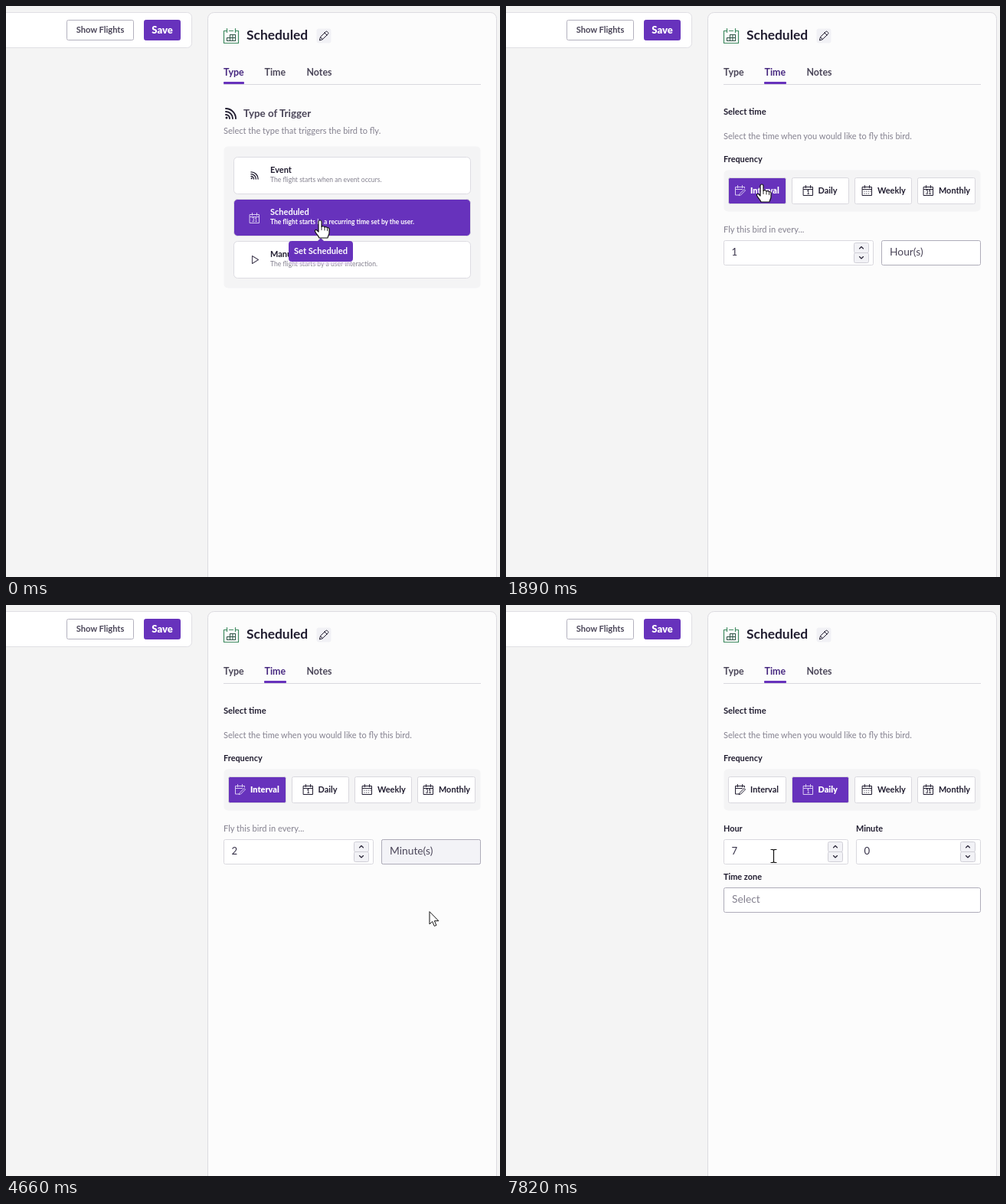
Animation, 645 px wide and 746 px high, one loop 8 s. Source, as an HTML page:

```html
<!DOCTYPE html>
<html lang="en">
<head>
<meta charset="utf-8">
<title>Schedule panel</title>
<style>
  html, body { margin: 0; width: 100%; height: 100%; overflow: hidden; background: #f4f4f4; }
  svg { display: block; font-family: Lato, "Open Sans", sans-serif; }
  text { white-space: pre; }
</style>
</head>
<body>
<svg id="stage" width="645" height="746" viewBox="0 0 645 746"></svg>
<script>
const LOOP = 8000;
const PURPLE = '#6732bc', INK = '#211d30', MID = '#4b4659', GREY = '#84818f', LINE = '#d9d8de', EDGE = '#aeacb9';
const stage = document.getElementById('stage');

// Pointer path: time, x, y
const PATH = [
  [0, 410, 280], [70, 408, 276], [130, 404, 267], [269, 404, 267], [270, 403, 268], [463, 403, 268],
  [870, 354, 64], [1000, 353, 76], [1279, 353, 76], [1280, 348, 131], [1760, 333, 236], [1890, 334, 233],
  [2030, 334, 233], [2520, 330, 329], [2990, 330, 329], [3330, 540, 322], [3590, 562, 334],
  [3665, 562, 334], [4130, 546, 380], [4530, 553, 401], [4660, 553, 401], [5410, 372, 337],
  [5489, 372, 337], [5490, 381, 331], [6553, 381, 331], [6890, 393, 241], [7430, 393, 241],
  [7620, 353, 333], [7759, 353, 333], [7820, 349, 328], [8000, 349, 328]
];
// Text caret: from, to, x
const CARETS = [[2850, 3050, 301.5], [5190, 5690, 301.5], [5890, 6420, 309.5], [6620, 7030, 309.5], [7620, 7760, 302.5]];

const clamp = v => Math.max(0, Math.min(1, v));
const between = (v, a, b) => v >= a && v < b;

function pointer(t) {
  const i = PATH.findIndex(k => k[0] > t);
  const [a, ax, ay] = PATH[i - 1], [b, bx, by] = PATH[i];
  const u = Math.floor((t - a) / 67 + 0.01) * 67 / (b - a);
  const e = u * u * (3 - 2 * u);
  return [Math.round(ax + (bx - ax) * e), Math.round(ay + (by - ay) * e)];
}

// Drawing helpers
const text = (x, y, s, size, fill = INK, weight = 400, anchor = 'start') =>
  `<text x="${x}" y="${y}" font-size="${size}" fill="${fill}" font-weight="${weight}" text-anchor="${anchor}">${s}</text>`;
const label = (x, y, s) => text(x, y, s, 10.9, INK, 700);
const box = (x, y, w, h, fill, stroke = 'none', r = 2) =>
  `<rect x="${x + .5}" y="${y + .5}" width="${w - 1}" height="${h - 1}" rx="${r}" fill="${fill}" stroke="${stroke}"/>`;
const path = (d, stroke, width = 1, fill = 'none', dash = 'none') =>
  `<path d="${d}" fill="${fill}" stroke="${stroke}" stroke-width="${width}" stroke-dasharray="${dash}" stroke-linejoin="round" stroke-linecap="round"/>`;
const at = (x, y, s, scale = 1) => `<g transform="translate(${x} ${y}) scale(${scale})">${s}</g>`;

const waves = (x, y, scale) => at(x, y, path('M0-5a5 5 0 0 1 5 5M0-9a9 9 0 0 1 9 9M0-13a13 13 0 0 1 13 13', INK, 1.9)
  + `<circle cx="1" cy="-1" r="1.5" fill="${INK}"/>`, scale);

function calendar(x, y, colour, kind) {
  const marks = {
    Interval: path('M6 11.5l6-6 1.5 1.5-6 6-2 .5z', colour),
    Daily: text(6.5, 11.8, '1', 7, colour, 700, 'middle'),
    Weekly: path('M3 8h8M3 11h6', colour, 1.2, 'none', '.1 2.5'),
    Monthly: text(6.5, 11.8, '31', 6.5, colour, 700, 'middle')
  };
  const frame = kind === 'Interval' ? 'M5 13H.5V2.5h12V4M.5 5.5h9M3.5.5v3M9.5.5v3'
    : 'M.5 2.5h12v11H.5zM.5 5.5h12M3.5.5v3M9.5.5v3';
  return at(x, y, path(frame, colour) + marks[kind]);
}

function spinner(x, y) {
  return box(x, y, 20, 14, '#f2f2f6', '#cfced6') + box(x, y + 13, 20, 14, '#f2f2f6', '#cfced6')
    + path(`M${x + 7.5} ${y + 8}l2.5-2.5 2.5 2.5M${x + 7.5} ${y + 18.5}l2.5 2.5 2.5-2.5`, INK, 1.1);
}

const numberField = (x, y, w, value, h = 33) => box(x, y, w, h, '#fff', LINE)
  + text(x + 10.5, y + h - 13, value, 13.2, '#38334a') + spinner(x + w - (w > 180 ? 26 : 27), y + h - 30);

const selectField = (x, y, w, s, fill) => box(x, y, w, 33, '#fff', EDGE) + text(x + 11, y + 20, s, 13.8, fill);

function chrome(t) {
  const slide = clamp((t - 930) / 180), onTime = t >= 930;
  const tab = (x, s, on) => text(x, 91, s, 12.4, on ? '#45267f' : MID, 700);
  return box(-12, 8, 255, 47, '#fff', '#e0dfe4', 6)
    + box(79, 18, 88, 27, '#fff', '#b3b1be') + text(123, 35, 'Show Flights', 11.1, MID, 700, 'middle')
    + box(180, 18, 48, 27, PURPLE, PURPLE) + text(204, 36, 'Save', 13, '#fff', 900, 'middle')
    + box(263, 8, 378, 760, '#fcfcfc', '#dcdbe0', 8)
    + path('M288.5 32.5h-4v16h19v-16h-4M291.5 32.5h5M288.5 29.5v5M299.5 29.5v5', '#3f8a60', 1.2)
    + path('M292.5 37.5h7v8h-11v-4h11M292.5 37.5v8M296 37.5v8', '#33584a', 1.1)
    + text(314, 44, 'Scheduled', 17.4, INK, 700)
    + box(405, 29, 20, 20, '#f1f1f5', 'none', 3)
    + path('M409.5 44.5l1-4 7-7q1-.8 2 0l1 1q.8 1 0 2l-7 7zM416 35l3 3M410.5 40.5l3 3', INK)
    + tab(284, 'Type', !onTime) + tab(337.5, 'Time', onTime) + tab(392.5, 'Notes', false)
    + `<path d="M284 102.5H620" stroke="${LINE}"/>`
    + `<rect x="${284 + 53 * slide}" y="99" width="${27 + 2 * slide}" height="3" rx="1" fill="${PURPLE}"/>`;
}

function typePage(t) {
  const row = (y, title, sub, on) => box(297, y, 310, 49, on ? PURPLE : '#fff', '#dddce2', 5)
    + text(345, y + 21, title, 11, on ? '#fff' : INK, 700)
    + text(345, y + 33, sub, on ? 8.45 : 8.6, on ? '#fff' : GREY, on ? 700 : 400);
  let s = waves(287, 147, 1) + text(310, 145, 'Type of Trigger', 13.4, MID, 700)
    + text(284, 167, 'Select the type that triggers the bird to fly.', 11.05, GREY)
    + box(284, 183, 336, 186, '#f4f4f5', 'none', 5)
    + row(197, 'Event', 'The flight starts when an event occurs.')
    + row(252, 'Scheduled', 'The flight starts in a recurring time set by the user.', true)
    + row(307, 'Manual', 'The flight starts by a user interaction.')
    + waves(320, 226, .7) + calendar(318, 270, '#d9cbf2', 'Monthly')
    + path('M321.5 326.5v10l8-5z', MID, 1.1);
  if (t < 270) {
    const dx = t < 70 ? 0 : t < 130 ? -3 : -6;
    s += at(dx, dx / 2, `<rect x="370" y="310" width="82" height="28" rx="4" fill="#e9d9f8" opacity=".5"/>`
      + box(369, 307, 84, 27, PURPLE, PURPLE, 3) + path('M407 307l4-4 4 4z', PURPLE, 0, PURPLE)
      + text(411, 324, 'Set Scheduled', 11.1, '#fff', 700, 'middle'));
  }
  return s;
}

function frequency(active, px, py) {
  const items = [['Interval', 290, 76, 299, 319], ['Daily', 373, 75, 388, 407.5],
    ['Weekly', 455, 75, 465, 485], ['Monthly', 537, 76, 545, 565]];
  return text(284, 142, 'Select time', 11.2, INK, 700)
    + text(284, 174, 'Select the time when you would like to fly this bird.', 11, GREY)
    + label(284, 204, 'Frequency') + box(284, 214, 336, 55, '#f4f4f5', 'none', 5)
    + items.map(([name, x, w, iconX, textX]) => {
      const on = name === active, hover = between(px, x, x + w) && between(py, 224, 259);
      return box(x, 224, w, 35, on ? PURPLE : hover ? '#f4f3f8' : '#fff', LINE)
        + calendar(iconX, 234, on ? '#d9cbf2' : INK, name)
        + text(textX, 245, name, 10.9, on ? '#fff' : INK, on ? 900 : 700);
    }).join('');
}

const clock = (y, hour, h) => label(284, y, 'Hour') + label(457, y, 'Minute')
  + numberField(284, y + 10, 163, hour, h) + numberField(457, y + 10, 163, 0, h);

const zone = y => label(284, y, 'Time zone') + selectField(284, y + 10, 336, 'Select', GREY);

const weeklyPage = () => label(284, 296, 'Days')
  + [...'SMTWTFS'].map((d, i) => {
    const x = Math.floor(284 + i * 28.36);
    return box(x, 312, 21, 20, '#fff', '#85828f', 1) + text(x + 10.5, 326, d, 11, INK, 700, 'middle');
  }).join('')
  + clock(352, 0, 34) + zone(416);

function intervalPage(t) {
  const typing = between(t, 3400, 4460), open = between(t, 3400, 4640);
  let s = text(284, 296, 'Fly this bird in every...', 11.1, GREY)
    + numberField(284, 306, 196, t < 2850 ? 1 : t < 5890 ? 2 : 25)
    + box(490, 306, 130, 33, '#fff', EDGE);
  if (t >= 4460) s += `<g opacity="${1 - clamp((t - 4730) / 250)}">${box(490, 306, 130, 33, '#f3f3f7', EDGE)}</g>`;
  s += text(501, 326, typing ? 'Start Typing...' : t < 3400 ? 'Hour(s)' : 'Minute(s)', 13.8, typing ? GREY : MID);
  if (open) s += `<g style="filter:drop-shadow(0 2px 5px #0003)">${box(490, 346, 130, 96, '#fff', '#dddce2')}</g>`
    + text(501.5, 377, 'Hour(s)', 13.9, '#38334a') + text(501.5, 414, 'Minute(s)', 13.9, '#38334a')
    + path(`M597 ${typing ? 374 : 411}l4 4.5 9-10`, INK, 1.2);
  return s;
}

function cursor(t, x, y) {
  const list = between(t, 3400, 4640) && y > 346;
  const hand = y < 104 || between(y, 224, 260) || (t < 930 && between(y, 197, 356)) || list;
  const beam = t > 1890 && between(y, 306, 339) && x < (t < 7060 ? 454 : 420);
  if (hand) return at(x, y, path('M-2 2a2 2 0 0 1 4 0v6.5c.5-1.2 3.4-1 4 .7.6-1.1 3-.8 3.4.8.8-.8 2.6-.2 2.6 1.6v5c0 2-1.5 3.5-2 6.4H-1c-1-3-4-5-5.5-8.5-.5-1.7 1-2.7 2.5-1.5l2 2z', '#111', 1.2, '#fff')
    + path('M2 9v3.5M6 10v3M9.5 11v2.5', '#111', .9));
  if (beam) {
    const d = 'M-3.5-8.5h2.5l1 1 1-1h2.5M0-7.5v15M-3.5 8.5h2.5l1-1 1 1h2.5';
    return at(x + .5, y, path(d, '#fff', 2.6) + path(d, '#111', 1.2));
  }
  return at(x, y, path('M0 0v16l3.7-3.5 2.6 6 2.6-1.1-2.5-5.7h5.1z', '#111', 1, '#fff'));
}

function scene(t) {
  const [x, y] = pointer(t);
  let s = chrome(t);
  if (t < 930) s += typePage(t);
  else if (t < 1820) s += frequency('Weekly', x, y) + weeklyPage();
  else if (t < 7060) s += frequency('Interval', x, y) + intervalPage(t);
  else s += frequency('Daily', x, y) + clock(296, t < 7760 ? 0 : 7, 33) + zone(359);
  const caret = CARETS.find(([a, b]) => between(t, a, b));
  if (caret) s += `<path d="M${caret[2]} 313V330" stroke="${INK}"/>`;
  return s + cursor(t, x, y);
}

let shown = '';
function draw(now) {
  const next = scene(now % LOOP);
  if (next !== shown) stage.innerHTML = shown = next;
  requestAnimationFrame(draw);
}
draw(0);
</script>
</body>
</html>
```
